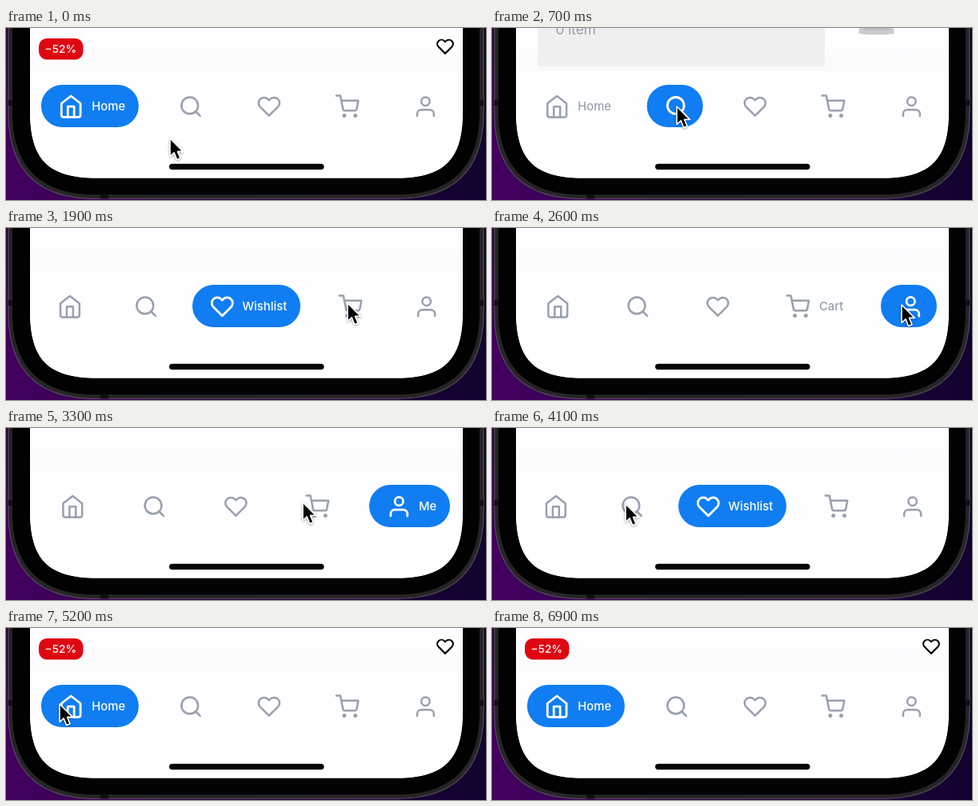
Recreate the animation shown at these times as an HTML page. Size 600 px wide and 215 px high, loop 7000 ms.

```html
<!DOCTYPE html>
<html lang="en">
<head>
<meta charset="utf-8">
<title>Tab bar</title>
<style>
html, body { margin: 0; width: 100%; height: 100%; overflow: hidden; background: #000; }
svg { display: block; width: 600px; height: 215px; }
text { font-family: Inter, sans-serif; font-weight: 500; }
.icon { fill: none; stroke-linecap: round; stroke-linejoin: round; }
.icon * { vector-effect: non-scaling-stroke; }
#cursor { filter: drop-shadow(0 1.5px 1.5px rgba(0, 0, 0, .35)); }
</style>
</head>
<body>
<svg viewBox="0 0 600 215" xmlns="http://www.w3.org/2000/svg">
  <defs>
    <linearGradient id="wall">
      <stop offset="0" stop-color="#43005f"/>
      <stop offset=".5" stop-color="#260340"/>
      <stop offset="1" stop-color="#120230"/>
    </linearGradient>
    <linearGradient id="dim" x2="0" y2="1">
      <stop offset="0" stop-color="#000" stop-opacity=".35"/>
      <stop offset=".75" stop-color="#000" stop-opacity="0"/>
    </linearGradient>
    <linearGradient id="shade" x2="0" y2="1">
      <stop offset="0" stop-color="#201830" stop-opacity="0"/>
      <stop offset="1" stop-color="#201830" stop-opacity=".016"/>
    </linearGradient>
    <clipPath id="screen"><path id="screenPath"/></clipPath>
  </defs>

  <rect width="600" height="215" fill="url(#wall)"/>
  <rect width="600" height="215" fill="url(#dim)"/>
  <g id="body"></g>

  <g clip-path="url(#screen)">
    <rect width="600" height="215" fill="#fefdff"/>
    <rect y="14" width="600" height="40" fill="url(#shade)"/>
    <g id="homePage">
      <rect x="41" y="13" width="55.5" height="26.5" rx="10" fill="#df0612"/>
      <text x="68.3" y="31.2" font-size="13.7" text-anchor="middle" fill="#fff">−52%</text>
      <g id="like" class="icon" stroke="#0b0b0d" stroke-width="2.2" transform="translate(549 23.3) scale(.94) translate(-12 -12.1)"></g>
    </g>
    <g id="shopPage">
      <rect x="57" y="-10" width="359" height="58" fill="#f0eff0"/>
      <text x="79.5" y="7.5" font-size="17.2" style="font-weight:400" fill="#969ba8">0 item</text>
      <path d="M460 -4H501L503 7Q481 10 458 7Z" fill="#cbcbcd"/>
      <path d="M466 -4H496V3H466Z" fill="#bdbdc0"/>
    </g>
    <rect y="54" width="600" height="161" fill="#fefdff"/>
    <g id="tabs"></g>
    <rect x="204" y="169.7" width="193.5" height="7.2" rx="3.6" fill="#050505"/>
  </g>

  <path id="cursor" d="M0 0V21.5L4.9 17 8.2 25.3 12.4 23.5 9 15.6H15.6Z" fill="#000" stroke="#fff" stroke-width="1.5" stroke-linejoin="round"/>
</svg>

<script>
const LOOP = 7000, MOVE = 350;
const LEFT = 30, SPAN = 541, BASE = 70, ICON_X = 37.3, MID = 98.2;
const BLUE = "#107df2", GREY = "#98a0b0";
const $ = id => document.getElementById(id);

function make(tag, parent, attrs) {
  const node = document.createElementNS("http://www.w3.org/2000/svg", tag);
  parent.append(node);
  return set(node, attrs);
}

function set(node, attrs) {
  for (const key in attrs) node.setAttribute(key, attrs[key]);
  return node;
}

// Bottom half of the phone: straight sides and smooth corners
function shell(l, r, b, size, k) {
  const y = b - size, c = size * k;
  return `M${l} -5V${y}C${l} ${b - c} ${l + c} ${b} ${l + size} ${b}` +
    `H${r - size}C${r - c} ${b} ${r} ${b - c} ${r} ${y}V-5Z`;
}

const body = $("body");
[[2.5, 597.5, 213.7, 108, "#5a575c"],
 [3.5, 596.5, 212.8, 107, "#252426"],
 [8, 592, 208.3, 103, "#020202"]].forEach(([l, r, b, size, fill]) =>
  make("path", body, { d: shell(l, r, b, size, .34), fill }));
[[3, 90, 5.5, 7], [591.5, 90, 5.5, 7], [118, 208, 10, 5.5]].forEach(([x, y, width, height]) =>
  make("rect", body, { x, y, width, height, fill: "#111012" }));
$("screenPath").setAttribute("d", shell(30, 571, 187.5, 84, .27));

const HEART = '<path d="M20.84 4.61a5.5 5.5 0 0 0-7.78 0L12 5.67l-1.06-1.06a5.5 5.5 0 0 0-7.78 7.78L12 21.23l8.84-8.84a5.5 5.5 0 0 0 0-7.78z"/>';
$("like").innerHTML = HEART;

const TABS = [
  { label: "Home", extra: 52, scale: 1.32, art: '<path d="M3 9l9-7 9 7v11a2 2 0 0 1-2 2H5a2 2 0 0 1-2-2z"/><path d="M9 22V12h6v10"/>' },
  { label: "Shop", extra: 47, scale: 1.3, art: '<circle cx="11" cy="11" r="8"/><path d="M21 21l-4.35-4.35"/>' },
  { label: "Wishlist", extra: 65, scale: 1.25, art: HEART },
  { label: "Cart", extra: 41, scale: 1.25, art: '<circle cx="9" cy="21" r="1"/><circle cx="20" cy="21" r="1"/><path d="M1 1h4l2.68 13.39a2 2 0 0 0 2 1.61h9.72a2 2 0 0 0 2-1.61L23 6H6"/>' },
  { label: "Me", extra: 31, scale: 1.31, art: '<path d="M20 21v-2a4 4 0 0 0-4-4H8a4 4 0 0 0-4 4v2"/><circle cx="12" cy="7" r="4"/>' }
];

for (const tab of TABS) {
  tab.pill = make("rect", $("tabs"), { y: 71, height: 53, rx: 26.5, fill: BLUE });
  tab.text = make("text", $("tabs"), { y: 102.6, "font-size": 14.8, "text-anchor": "end" });
  tab.text.textContent = tab.label;
  tab.icon = make("g", $("tabs"), { class: "icon" });
  tab.icon.innerHTML = tab.art;
}

// time, tab
const TAPS = [[-1000, 0], [680, 1], [1380, 2], [1960, 3], [2590, 4],
  [3360, 3], [3730, 2], [4230, 1], [4830, 0]];

// time, x, y
const TRAIL = [[0, 205, 138], [120, 205, 138], [560, 231, 98], [760, 231, 98],
  [1250, 340, 92], [1450, 340, 92], [1840, 427, 94], [2030, 427, 94],
  [2500, 512, 96], [2750, 512, 96], [3250, 371, 93], [3400, 371, 93],
  [3660, 272, 94], [3780, 272, 94], [4080, 167, 95], [4320, 167, 95], [4740, 67, 95]];
const HIDE = 6000;

const clamp = v => Math.max(0, Math.min(1, v));
const ease = v => v < .5 ? 4 * v ** 3 : 1 - (2 - 2 * v) ** 3 / 2;
const smooth = v => v * v * (3 - 2 * v);

function drawTabs(t) {
  let n = TAPS.length - 1;
  while (TAPS[n][0] > t) n--;
  const active = TAPS[n][1];
  const last = n ? TAPS[n - 1][1] : active;
  const p = ease(clamp((t - TAPS[n][0]) / MOVE));
  const open = TABS.map((_, i) => i === active ? p : i === last ? 1 - p : 0);

  const widths = TABS.map((tab, i) => BASE + tab.extra * open[i]);
  const gap = (SPAN - widths.reduce((a, b) => a + b)) / TABS.length;
  let x = LEFT + gap / 2;
  TABS.forEach((tab, i) => {
    const on = i === active, v = open[i];
    set(tab.pill, { x, width: widths[i], visibility: on ? "visible" : "hidden" });
    set(tab.text, { x: x + widths[i] - 16.8, fill: on ? "#fff" : GREY, opacity: on ? v ** 8 : v * v });
    set(tab.icon, {
      stroke: on ? "#fff" : GREY,
      "stroke-width": on ? 2.8 : 2.5,
      transform: `translate(${x + ICON_X} ${MID}) scale(${tab.scale}) translate(-12 -12)`
    });
    x += widths[i] + gap;
  });
  $("homePage").style.display = active === 0 ? "" : "none";
  $("shopPage").style.display = active === 1 ? "" : "none";
}

function drawCursor(t) {
  let n = TRAIL.length - 1;
  while (TRAIL[n][0] > t) n--;
  const a = TRAIL[n], b = TRAIL[n + 1] || a;
  const p = smooth(clamp((t - a[0]) / (b[0] - a[0] || 1)));
  const mix = i => a[i] + (b[i] - a[i]) * p;
  set($("cursor"), {
    transform: `translate(${mix(1)} ${mix(2)}) scale(1.05)`,
    visibility: t < HIDE ? "visible" : "hidden"
  });
}

function draw(t) {
  drawTabs(t);
  drawCursor(t);
}

let start;
function tick(now) {
  start ??= now;
  draw((now - start) % LOOP);
  requestAnimationFrame(tick);
}
draw(0);
requestAnimationFrame(tick);
</script>
</body>
</html>
```
